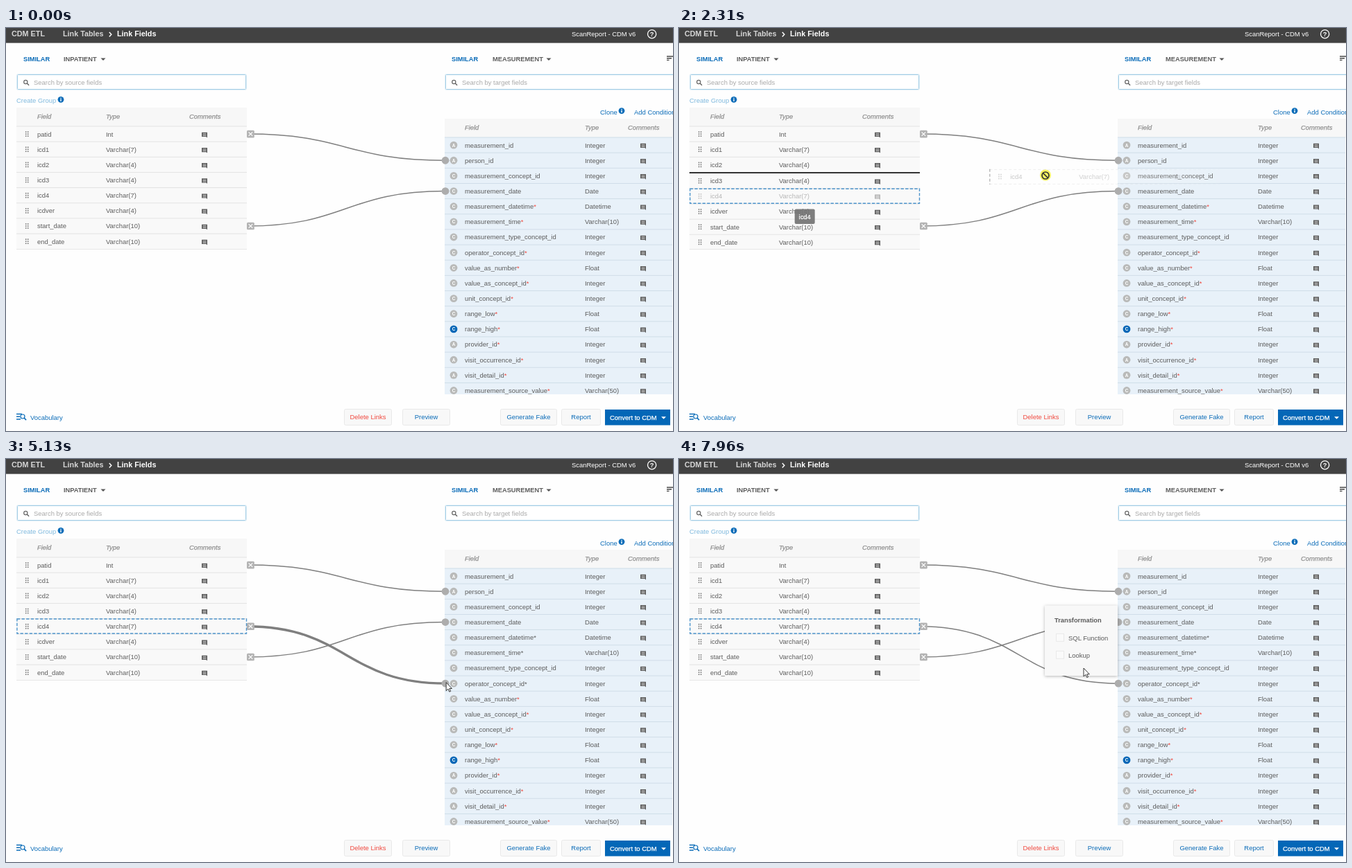
An HTML page for the animation above (8000 ms loop, 961 px wide and 582 px high).

```html
<!DOCTYPE html>
<html lang="en">
<head>
<meta charset="utf-8">
<title>Link Fields</title>
<style>
html, body { margin: 0; width: 100%; height: 100%; overflow: hidden; background: #fefefe; }
svg { display: block; width: 100vw; height: 100vh; }
text { font: 9.45px "Liberation Sans", Arial, sans-serif; fill: #5c5c5c; white-space: pre; }
.b { font-weight: bold; font-size: 9.3px; }
.top { font-weight: bold; font-size: 10.8px; }
.th { font-style: italic; font-size: 9.4px; fill: #8f8f8f; stroke: #8f8f8f; stroke-width: .25; }
.hint { fill: #a9a9a9; }
.blue { fill: #0b6cb8; }
.pale { fill: #7fb9de; }
.white { fill: #fff; }
.firm { stroke: #fff; stroke-width: .25; }
.mid { text-anchor: middle; }
.star { fill: #f0483e; }
.tiny { font-size: 6.5px; font-weight: bold; fill: #fff; text-anchor: middle; }
.link { fill: none; stroke: #7f7f7f; stroke-width: 1.5; }
#popup { filter: drop-shadow(0 1px 2px rgba(0, 0, 0, .28)); }
</style>
</head>
<body>
<svg id="stage" viewBox="0 0 961 582" xmlns="http://www.w3.org/2000/svg"></svg>
<script>
const LOOP = 8000, PITCH = 22.15, SRC_TOP = 142, DST_TOP = 158;
const GRAB = { x: 66, y: 242 };

const sources = ['patid Int', 'icd1 Varchar(7)', 'icd2 Varchar(4)', 'icd3 Varchar(4)',
  'icd4 Varchar(7)', 'icdver Varchar(4)', 'start_date Varchar(10)', 'end_date Varchar(10)']
  .map(s => s.split(' '));
const targets = ['A measurement_id Integer', 'A person_id Integer', 'C measurement_concept_id Integer',
  'C measurement_date Date', 'C measurement_datetime* Datetime', 'C measurement_time* Varchar(10)',
  'C measurement_type_concept_id Integer', 'C operator_concept_id* Integer', 'C value_as_number* Float',
  'C value_as_concept_id* Integer', 'C unit_concept_id* Integer', 'C range_low* Float',
  'C range_high* Float', 'A provider_id* Integer', 'A visit_occurrence_id* Integer',
  'A visit_detail_id* Integer', 'C measurement_source_value* Varchar(50)'].map(s => s.split(' '));

// ---- drawing helpers (text is placed by its vertical centre) ----
const text = (x, y, s, cls = '') => `<text x="${x}" y="${y + 3.4}" class="${cls}">${s}</text>`;
const rect = (x, y, w, h, fill, more = '') =>
  `<rect x="${x}" y="${y}" width="${w}" height="${h}" fill="${fill}" ${more}/>`;
const circle = (x, y, r, fill, more = '') => `<circle cx="${x}" cy="${y}" r="${r}" fill="${fill}" ${more}/>`;
const path = (d, more) => `<path d="${d}" ${more}/>`;
const group = (id, body, more = '') => `<g id="${id}" ${more}>${body}</g>`;
const srcY = i => SRC_TOP + 11.1 + i * PITCH;
const dstY = i => DST_TOP + 11.1 + i * PITCH;

const caret = (x, y, fill) => path(`M${x - 3.5} ${y - 1.5}h7l-3.5 3.5z`, `fill="${fill}"`);
const info = (x, y) => circle(x, y, 4.4, '#0b6cb8') + rect(x - .7, y - .8, 1.4, 3.4, '#fff') + rect(x - .7, y - 2.7, 1.4, 1.2, '#fff');
const note = (x, y) => path(`M${x - 4} ${y - 3.3}h8v7.6l-1.6-1.4h-6.4z`, 'fill="#5a5a5a"') +
  path(`M${x - 2.5} ${y - 1.5}h5m-5 1.5h5m-5 1.5h5`, 'stroke="#f4f4f4" stroke-width=".6"');
const lens = (x, y, r, color) => circle(x, y, r, 'none', `stroke="${color}" stroke-width="1.2"`) +
  path(`M${x + r * .7} ${y + r * .7}l3 3`, `stroke="${color}" stroke-width="1.5"`);
const button = (x, w, label, cls) => rect(x + .5, 550.5, w - 1, 23, '#f8f8f8', 'stroke="#e9e9e9" rx="2"') +
  text(x + w / 2, 562, label, 'mid ' + cls);
const search = (x, w, label) => rect(x - .5, 66.5, w + 1, 23, 'none', 'stroke="#e0eff7" rx="2"') +
  rect(x + .5, 67.5, w - 1, 21, '#fff', 'stroke="#a3cde5" rx="1"') +
  lens(x + 12.3, 78, 2.6, '#666') + text(x + 24, 78.3, label, 'hint');
const heading = (y, cols) => ['Field', 'Type', 'Comments'].map((s, i) => text(cols[i], y, s, 'th')).join('');
const dots = (x, y) => [-3, 0, 3].map(d => rect(x - 2.1, y + d - .8, 1.6, 1.6, '#777') + rect(x + .9, y + d - .8, 1.6, 1.6, '#777')).join('');
const cells = (name, type, y) => dots(30, y) + text(45, y, name) + text(144, y, type) + note(286, y + 1);
const link = (id, a, b) => {
  const y0 = srcY(a), y1 = dstY(b);
  return group(id, path(`M347 ${y0}C490 ${y0} 490 ${y1} 633 ${y1}`, 'class="link"') +
    rect(347, y0 - 5.3, 10.8, 10.6, '#b3b3b3', 'rx="1.5"') +
    path(`M349.6 ${y0 - 2.8}l5.6 5.6m0-5.6l-5.6 5.6`, 'stroke="#fff" stroke-width="1.2"') +
    circle(633, y1, 5.4, '#adadad'));
};

// ---- static parts ----
const topBar = rect(0, 0, 961, 21.6, '#424242') +
  '<g fill-opacity=".78">' + text(8, 8.8, 'CDM ETL', 'top white') + text(82, 8.8, 'Link Tables', 'top white') + '</g>' +
  path('M148.8 6l3 3.2-3 3.2', 'fill="none" stroke="#fff" stroke-width="1.5"') +
  text(160, 8.8, 'Link Fields', 'top white') + text(815, 8.3, 'ScanReport - CDM v6', 'white') +
  circle(930.6, 8.7, 6.1, 'none', 'stroke="#fff" stroke-width="1.3"') + text(930.6, 8.7, '?', 'b white mid');

const tabs = text(25, 45, 'SIMILAR', 'b blue') + text(83, 45, 'INPATIENT', 'b') + caret(140, 45, '#555') +
  text(642, 45, 'SIMILAR', 'b blue') + text(701, 45, 'MEASUREMENT', 'b') + caret(782, 45, '#555') +
  path('M952 41h10m-10 2.7h7m-7 2.7h3.5', 'stroke="#444" stroke-width="1.4"') +
  search(16, 330, 'Search by source fields') + search(633, 340, 'Search by target fields') +
  text(15, 104.3, 'Create Group', 'pale') + info(79, 103.3) +
  text(856, 121.5, 'Clone', 'blue') + info(887, 119.6) + text(905, 121.5, 'Add Condition', 'blue');

const footer = path('M15 557.5h8m-8 3.8h5m-5 3.8h6', 'stroke="#0b6cb8" stroke-width="1.5"') +
  lens(24, 561, 3, '#0b6cb8') + text(35, 562.3, 'Vocabulary', 'blue') +
  button(487, 69, 'Delete Links', 'star') + button(571, 69, 'Preview', 'blue') +
  button(712, 82, 'Generate Fake', 'blue') + button(800, 57, 'Report', 'blue') +
  rect(863, 551, 94, 22.6, '#0467b7') + text(870, 562.3, 'Convert to CDM', 'white firm') + caret(947.5, 562.8, '#fff');

const sourceTable = rect(15, 115, 332, 27, '#f7f7f7') + heading(128, [45, 144, 264]) +
  sources.map(([name, type], i) => {
    const top = SRC_TOP + i * PITCH;
    return group('s' + i, rect(15, top, 332, PITCH, '#f9f9f9') +
      rect(15, top - .5, 332, 1, '#e3e3e3') + group('c' + i, cells(name, type, srcY(i))));
  }).join('') + rect(15, 319, 332, 1, '#e6e6e6') +
  group('insert', rect(15, 208, 332, 2, '#333')) +
  group('dash', rect(15.9, 231, 330.6, 21, 'none', 'stroke="#4d94cb" stroke-width="1.4" stroke-dasharray="4.4 2.2"'));

const targetTable = rect(632, 131, 329, 27, '#f7f7f7') + heading(144, [661, 834, 896]) +
  '<g clip-path="url(#list)">' + targets.map(([kind, name, type], i) => {
    const y = dstY(i), top = DST_TOP + i * PITCH;
    const label = name.replace('*', `<tspan id="star${i}" class="star">*</tspan>`);
    return rect(632, top, 328, PITCH, '#e8f1f9') + rect(632, top - .5, 328, 1, '#cfdde8') +
      circle(645, y, 5.4, i === 12 ? '#0467b7' : '#b9bab9') +
      `<text x="645" y="${y + 2.4}" class="tiny">${kind}</text>` +
      text(661, y, label) + text(834, y, type) + note(918, y + 1);
  }).join('') + '</g>';

const ghost = group('ghost', '<g mask="url(#fade)">' +
  rect(15, 231, 332, 22, '#fff', 'opacity=".3"') +
  path('M15 231.5h332m-332 21h332', 'stroke="#777" stroke-dasharray="4 3" opacity=".12"') +
  path('M15.5 231v22', 'stroke="#555" stroke-width="1.3" stroke-dasharray="4 3" opacity=".45"') +
  '<g opacity=".34">' + cells('icd4', 'Varchar(7)', srcY(4)) + '</g></g>');

const option = (y, label) => rect(543.5, y - 6, 11, 11, '#fafafa', 'stroke="#e9e9e9"') + text(561, y, label);
const popup = group('popup', rect(527, 211.5, 105, 101.5, '#f8f8f8', 'rx="1"') +
  text(541, 232.3, 'Transformation', 'b') + option(258.3, 'SQL Function') + option(283.3, 'Lookup'));

const tip = (id, row, w) => group(id, rect(181.2 - w / 2, srcY(row) + 19.8, w, 21.6, '#737373', 'rx="2" opacity=".92"') +
  text(181.2, srcY(row) + 30.6, sources[row][0], 'mid white firm'));

const arrow = path('M0 0V12L2.8 9.4 4.7 13.5 6.5 12.8 4.7 8.8H8.3Z', 'fill="#fff" stroke="#222" stroke-width=".9"');
const pointer = group('pointer',
  group('glow', circle(0, -.5, 8, '#f8ec1c', 'opacity=".7"')) +
  group('arrow', arrow) +
  group('copy', arrow + rect(6.5, 11.5, 7, 7, '#fff', 'stroke="#222"') + path('M10 13v4m-2-2h4', 'stroke="#222"')) +
  group('move', path('M0-7.2L2.6-4.3H1V-1H4.3V-2.6L7.2 0 4.3 2.6V1H1V4.3H2.6L0 7.2-2.6 4.3H-1V1H-4.3V2.6L-7.2 0-4.3-2.6V-1H-1V-4.3H-2.6Z', 'fill="#fff" stroke="#333" stroke-width=".9"')) +
  group('deny', circle(0, 0, 5, 'none', 'stroke="#333" stroke-width="1.7"') + path('M-3.5-3.5l7 7', 'stroke="#333" stroke-width="1.7"')));

document.getElementById('stage').innerHTML =
  '<defs><clipPath id="list"><rect x="632" y="150" width="329" height="379"/></clipPath>' +
  '<linearGradient id="ramp"><stop offset="0" stop-color="#fff"/><stop offset=".5" stop-color="#ccc"/>' +
  '<stop offset="1" stop-color="#333"/></linearGradient>' +
  '<mask id="fade" maskUnits="userSpaceOnUse" x="14" y="229" width="335" height="26">' + rect(14, 229, 335, 26, 'url(#ramp)') + '</mask></defs>' +
  topBar + tabs + footer + sourceTable + targetTable +
  link('linkA', 0, 1) + link('linkB', 6, 3) + link('linkC', 4, 7) +
  rect(632.7, 0, 327, 22, 'none', 'id="drop" stroke="#0b6cb8" stroke-width="1.4"') +
  tip('tipEnd', 7, 50) + tip('tipIcd', 4, 29) + ghost + popup + pointer;

// ---- motion ----
// Screen updates come in bursts: start, end, number of updates.
const bursts = [[300, 1080, 13], [1140, 1830, 12], [1950, 2700, 13], [2760, 3190, 8], [3700, 3820, 3],
  [4070, 4810, 13], [4930, 5610, 11], [5860, 5860, 1], [6040, 6040, 1], [6230, 6230, 1],
  [6720, 7170, 8], [7360, 7960, 11]];
// Pointer track: time, x, y.
const track = [[300, 861, 550], [420, 800, 520], [850, 240, 325], [1000, 136, 295], [1080, 148, 310],
  [1205, 148, 310], [1500, 110, 262], [1700, 72, 236], [1830, 66, 242], [1890, 66, 242],
  [2325, 528, 213], [2500, 655, 235], [2700, 702, 292], [2944, 708.5, 315], [3190, 708, 324],
  [3700, 708, 330], [3820, 708, 337], [4010, 708, 344], [4193, 679, 335], [4600, 646, 327],
  [4810, 635, 326], [5200, 634, 322], [5610, 632, 324], [6660, 632, 324], [7170, 617, 267],
  [7300, 617, 267], [7600, 517, 241], [7960, 583, 302]];

function settle(t) {
  let held = 0;
  for (const [a, b, n] of bursts) {
    if (t < a) break;
    const step = n > 1 ? (b - a) / (n - 1) : 1;
    held = Math.min(b, a + Math.floor((t - a) / step + .3) * step);
  }
  return held;
}

function place(t) {
  const i = track.findIndex(k => k[0] > t);
  if (i === 0) return { x: track[0][1], y: track[0][2] };
  if (i < 0) { const end = track[track.length - 1]; return { x: end[1], y: end[2] }; }
  const [t0, x0, y0] = track[i - 1], [t1, x1, y1] = track[i];
  const p = (t - t0) / (t1 - t0);
  return { x: x0 + (x1 - x0) * p, y: y0 + (y1 - y0) * p };
}

const $ = id => document.getElementById(id);
const show = (id, on) => { $(id).style.display = on ? '' : 'none'; };
const shift = (id, x, y) => $(id).setAttribute('transform', `translate(${x} ${y})`);
const within = (t, a, b) => t >= a && t < b;

function draw(t) {
  const { x, y } = place(t);
  const drag = within(t, 1940, 3700);
  const over = drag && x > 640;
  const cursor = drag ? (over ? 'copy' : 'deny')
    : within(t, 940, 1940) || within(t, 3700, 4650) ? 'move' : 'arrow';

  show('pointer', t >= 300);
  shift('pointer', x, y);
  for (const kind of ['arrow', 'copy', 'move', 'deny']) show(kind, kind === cursor);
  show('glow', drag || within(t, 6040, 6230));

  show('ghost', drag);
  const lag = place(t - 28);
  shift('ghost', lag.x - GRAB.x, lag.y - GRAB.y);

  const gap = within(t, 2100, 2480);
  show('insert', gap);
  for (let i = 3; i < 8; i++) shift('s' + i, 0, gap ? 1.2 : 0);
  show('dash', t >= 1940);
  shift('dash', 0, gap ? 1.2 : 0);
  $('c4').setAttribute('opacity', drag ? .42 : 1);

  show('drop', over);
  const row = Math.floor((y - 4 - DST_TOP) / PITCH);
  $('drop').setAttribute('y', DST_TOP + row * PITCH + .2);
  for (const [i, at] of [[4, 2640], [5, 2700], [7, 2940]])
    $('star' + i).setAttribute('class', t >= at ? '' : 'star');

  show('tipEnd', within(t, 1140, 1330));
  show('tipIcd', within(t, 1640, 3700));

  show('linkC', t >= 3700);
  const bold = within(t, 4930, 5400) || within(t, 5860, 6230);
  $('linkC').firstChild.style.strokeWidth = bold ? 3.4 : 1.5;
  show('popup', t >= 6230);
}

function tick() {
  draw(settle(performance.now() % LOOP));
  requestAnimationFrame(tick);
}
tick();
</script>
</body>
</html>
```
